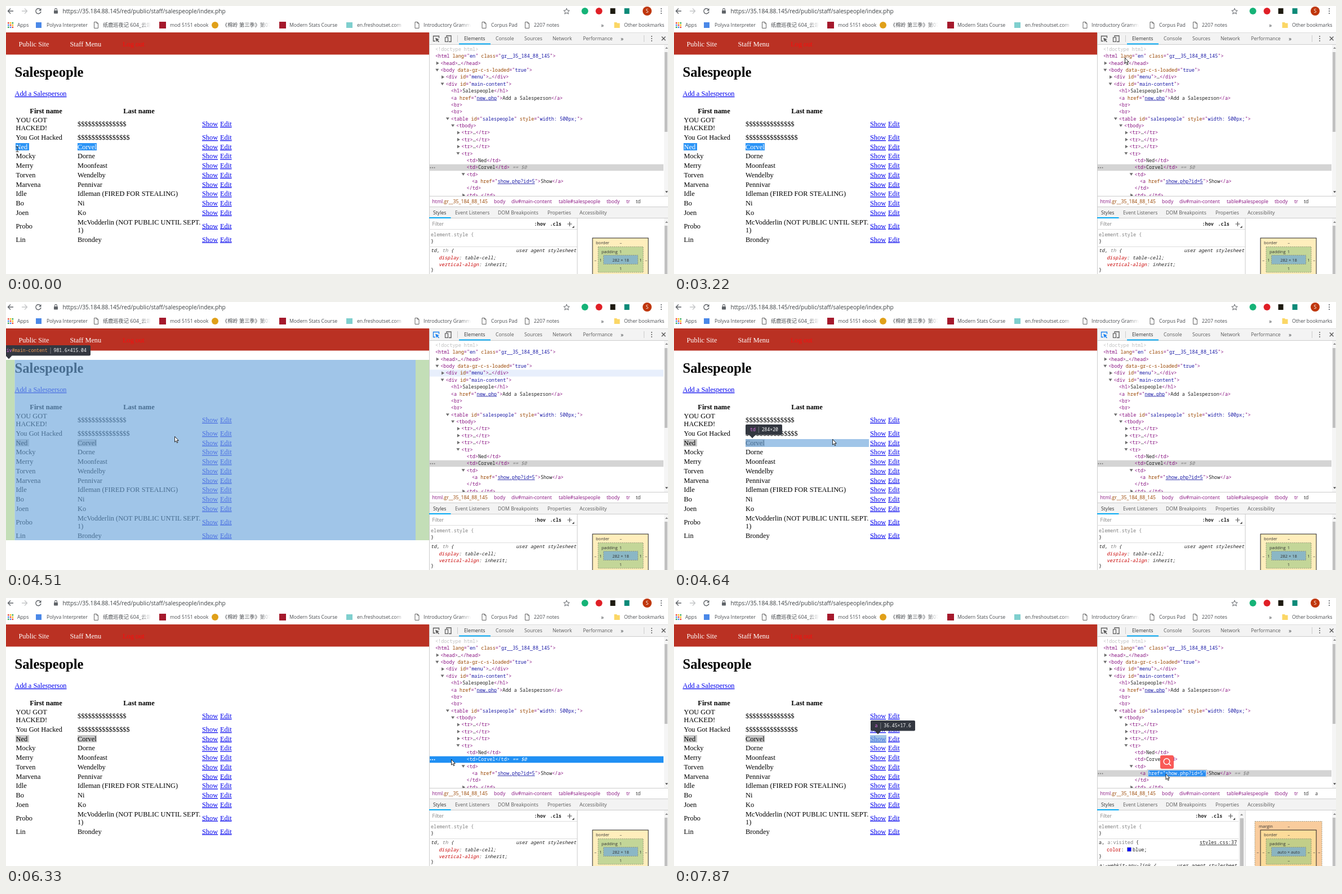
An HTML page that plays this animation: 1175 px wide and 477 px high, repeating every 8 s.

```html
<!DOCTYPE html>
<html lang="en">
<head>
<meta charset="utf-8">
<title>Salespeople</title>
<style>
html, body { margin: 0; width: 100%; height: 100%; overflow: hidden; background: #fff; }
svg { display: block; width: 100vw; height: 100vh; }
text { white-space: pre; }
.ui { font: 8.7px "Open Sans", "Noto Sans CJK SC", "Noto Sans CJK JP", "Noto Sans CJK", sans-serif; fill: #4a4d51; }
.cjk { font-size: 9.2px; }
.url { font-size: 10.2px; fill: #3c4043; }
.dev { fill: #5a5a5a; }
.dark { fill: #333; }
.box { font-size: 7.5px; fill: #333; }
.mid { text-anchor: middle; }
.end { text-anchor: end; }
.page { font: 12.36px "Liberation Serif", serif; fill: #000; }
.head { font-weight: bold; }
.h1 { font-weight: bold; font-size: 24.7px; }
.link { fill: #00e; text-decoration: underline; }
.mono { font: 8.47px "Noto Sans Mono", "DejaVu Sans Mono", monospace; fill: #222; }
.bold { font-weight: bold; }
.it { font-style: italic; }
.grey { fill: #808080; }
.prop { fill: #c80000; }
.tag { fill: #881280; }
.attr { fill: #994500; }
.val { fill: #1a1aa6; }
.under { text-decoration: underline; }
.doc { fill: #c0c0c0; }
.tip { font: 8.1px "Noto Sans Mono", "DejaVu Sans Mono", monospace; fill: #fff; }
.white, .on text, .on tspan { fill: #fff; }
.red { fill: #f90d0d; }
</style>
</head>
<body>
<svg id="stage" viewBox="0 0 1175 477" preserveAspectRatio="none"></svg>
<script>
const LOOP = 8000, PITCH = 12.37, INDENT = 9.27, CHAR = 5.082;
const esc = s => s.replace(/&/g, '&amp;').replace(/</g, '&lt;');
const text = (x, y, s, cls) => `<text x="${x}" y="${y}" class="${cls}">${esc(s)}</text>`;
const rect = (x, y, w, h, fill, more = '') => `<rect x="${x}" y="${y}" width="${w}" height="${h}" fill="${fill}" ${more}/>`;
const dot = (x, y, r, fill) => `<circle cx="${x}" cy="${y}" r="${r}" fill="${fill}"/>`;
const line = (d, color, w = 1, more = '') => `<path d="${d}" fill="none" stroke="${color}" stroke-width="${w}" ${more}/>`;
const shape = (d, fill) => `<path d="${d}" fill="${fill}"/>`;
const group = (id, body, more = '') => `<g id="${id}" ${more}>${body}</g>`;

// translucent layers shared by the page overlay and the box model
const MARGIN = 'rgba(246,178,107,.66)', BORDER = 'rgba(255,229,153,.66)';
const PADDING = 'rgba(147,196,125,.55)', CONTENT = 'rgba(111,168,220,.66)';

function browserBar() {
  const ink = '#5f6368';
  let s = rect(0, 0, 1175, 47, '#fff') + rect(751, 47, 424, 1, '#ddd');
  s += line('M13 9H4M8 4.5L3.5 9L8 13.5', ink, 1.4) + line('M28 9H37M33 4.5L37.5 9L33 13.5', '#c4c6c8', 1.4);
  s += line('M61 6.2A4.6 4.6 0 1 0 62 10', ink, 1.4) + shape('M62.5 4V8.5H58Z', ink);
  s += rect(85, 8, 7, 5.5, ink, 'rx=".8"') + line('M86.6 8V6.3A1.9 1.9 0 0 1 90.4 6.3V8', ink, 1.1);
  s += text(100.5, 13, 'https://35.184.88.145/red/public/staff/salespeople/index.php', 'ui url');
  s += line('M995 4.2L996.5 7.8L1000.2 8.1L997.4 10.5L998.3 14.2L995 12.2L991.7 14.2L992.6 10.5L989.8 8.1L993.5 7.8Z', ink);
  s += dot(1027.5, 9, 6, '#15b377') + dot(1052.5, 9, 6, '#e01f26') + rect(1072.5, 4, 9, 10, '#1d1a10');
  s += rect(1097.5, 4, 9, 10, '#0d8a78') + dot(1138, 9, 8, '#bf360c') + text(1138, 12, 'S', 'ui mid white');
  for (const y of [5, 9, 13]) s += dot(1163, y, 1.1, ink);

  const marks = [[20, 'Apps'], [72, 'Polyva Interpreter'], [172, '纸鹿巡夜记 604_云端集', 1], [291, 'mod 5151 ebook'],
    [384, '《棉岭 第三季》第07集', 1], [503, 'Modern Stats Course'], [623, 'en.freshoutset.com', 2],
    [741, 'Introductory Grammar', 2], [861, 'Corpus Pad'], [937, '2207 notes'], [1097, 'Other bookmarks']];
  for (const [x, label, fade] of marks) {
    s += text(x, 37.2, label, fade === 1 ? 'ui cjk' : 'ui');
    if (fade) s += rect(x + 66, 26, 19, 16, 'url(#fade)') + rect(x + 85, 26, 14, 16, '#fff');
  }
  const hues = ['#ea4335', '#fbbc05', '#34a853', '#4285f4'];
  for (let i = 0; i < 9; i++) s += rect(3 + i % 3 * 3.8, 29 + Math.floor(i / 3) * 3.8, 2.5, 2.5, hues[(i * 5) % 4]);
  for (const x of [160, 729.5, 848.5, 925])
    s += line(`M${x - 3.5} 28.5H${x + 1}L${x + 3.5} 31V39.5H${x - 3.5}ZM${x + 1} 28.5V31H${x + 3.5}`, '#666');
  s += rect(53, 29, 10, 10, '#4a88e8') + rect(272, 28, 12, 12, '#a5192c') + dot(371, 34, 6, '#e0a019');
  s += rect(485, 28, 12, 12, '#a5192c') + rect(604, 29, 11, 10, '#7fcfce') + text(1056, 37.5, '»', 'ui url');
  return s + shape('M1079.5 29H1084L1085 30.5H1089.5V39H1079.5Z', '#fbd766');
}

const people = [['You Got Hacked', '$'.repeat(15)], ['Ned ', 'Corvel'], ['Mocky', 'Dorne'], ['Merry', 'Moonfeast'],
  ['Torven', 'Wendelby'], ['Marvena', 'Pennivar'], ['Idle', 'Idleman (FIRED FOR STEALING)'], ['Bo', 'Ni'], ['Joen', 'Ko']];

function page() {
  let s = rect(0, 47, 751, 39.5, '#ba3123');
  s += text(22.5, 72, 'Public Site', 'page white') + text(113.5, 72, 'Staff Menu', 'page white');
  s += text(207, 72, 'Log out', 'page red');
  s += text(15.5, 126, 'Salespeople', 'page h1') + text(15.5, 160, 'Add a Salesperson', 'page link');
  s += text(71, 190.5, 'First name', 'page head mid') + text(236, 190.5, 'Last name', 'page head mid');
  const links = y => text(348, y, 'Show', 'page link') + text(380, y, 'Edit', 'page link');
  s += text(17.5, 207, 'YOU GOT', 'page') + text(17.5, 221, 'HACKED!', 'page') + text(127, 214, '$'.repeat(14), 'page') + links(214);
  s += group('sel', rect(17, 244, 24, 13, 'inherit') + rect(127, 244, 34, 13, 'inherit'));
  people.forEach(([first, last], i) => {
    const y = 238 + i * 16.72;
    const cells = text(17.5, y, first, 'page') + text(127, y, last, 'page');
    s += (i === 1 ? group('selText', cells) : cells) + links(y);
  });
  s += text(17.5, 395.5, 'Probo', 'page') + text(127, 388.5, 'McVodderlin (NOT PUBLIC UNTIL SEPT.', 'page') + text(127, 402.5, '1)', 'page') + links(395.5);
  return s + text(17.5, 419.5, 'Lin', 'page') + text(127, 419.5, 'Brondey', 'page') + links(419.5);
}

function tip(x, y, w, arrow, name, size) {
  const sep = x + w - size.length * 4.87 - 13;
  return rect(x, y, w, 18.5, '#333740', 'rx="2"') + shape(`M${arrow - 6} ${y + 18}h12l-6 6.5Z`, '#333740') +
    `<text x="${sep - 5}" y="${y + 12}" class="tip end">${name}</text>` +
    rect(sep, y + 4, 1, 11, '#7a7d84') + text(sep + 6, y + 12, size, 'tip');
}
const pink = s => `<tspan fill="#e06ee8">${s}</tspan>`;

function overlays() {
  const main = rect(0, 103, 15.5, 321, PADDING) + rect(727, 103, 24, 321, PADDING) + rect(15.5, 103, 711.5, 321, CONTENT) +
    tip(-8, 77, 158, 5, pink('div') + '<tspan fill="#f29a55">#main-content</tspan>', '981.6×415.04');
  const cell = rect(127, 244, 219, 14, CONTENT) + tip(127, 218, 65, 139, pink('td'), '284×20');
  const link = rect(348, 244, 29, 14, CONTENT) + tip(349, 218, 79, 362, pink('a'), '36.45×17.6');
  return group('ovMain', main) + group('ovCell', cell) + group('ovLink', link);
}

// indent level, arrow (1 closed, 2 open), markup
const tree = [[0, 0, '<!doctype html>'], [0, 0, '<html lang="en" class="gr__35_184_88_145">'], [1, 1, '<head>…</head>'],
  [1, 2, '<body data-gr-c-s-loaded="true">'], [2, 1, '<div id="menu">…</div>'], [2, 2, '<div id="main-content">'],
  [3, 0, '<h1>Salespeople</h1>'], [3, 0, '<a href="new.php">Add a Salesperson</a>'], [3, 0, '<br>'], [3, 0, '<br>'],
  [3, 2, '<table id="salespeople" style="width: 500px;">'], [4, 2, '<tbody>'], [5, 1, '<tr>…</tr>'], [5, 1, '<tr>…</tr>'],
  [5, 1, '<tr>…</tr>'], [5, 2, '<tr>'], [6, 0, '<td>Ned</td>'], [6, 0, '<td>Corvel</td>'], [6, 2, '<td>'],
  [7, 0, '<a href="show.php?id=5">Show</a>'], [6, 0, '</td>'], [6, 1, '<td>…</td>']];
const MENU = 4, CELL = 17, LINK_CELL = 18, LINK = 19;
const rowX = i => 762 + tree[i][0] * INDENT;
const rowY = i => 80 + i * PITCH;

function markup(src) {
  const parts = src.match(/<!.*?>|<\/?\w+|>|\s[\w-]+(?==")|="|(?<==")[^"]+|"|[^<">]+/g);
  let last = '';
  return parts.map(p => {
    const cls = p.startsWith('<!') ? 'doc' : last === '="' ? (p.includes('.php') ? 'val under' : 'val')
      : /^(<|>|="|")/.test(p) ? 'tag' : p[0] === ' ' ? 'attr' : '';
    last = p;
    return `<tspan class="${cls}">${esc(p)}</tspan>`;
  }).join('');
}

function treeRow([, arrow, src], i) {
  const x = rowX(i), y = rowY(i);
  let s = arrow === 1 ? shape(`M${x - 7.5} ${y - 6}l5 3l-5 3Z`, '#6e6e6e') : arrow === 2 ? shape(`M${x - 9} ${y - 5.3}h6l-3 4.6Z`, '#6e6e6e') : '';
  s += `<text x="${x}" y="${y}" class="mono">${markup(src)}</text>`;
  if (i === CELL || i === LINK) s += group('mark' + i, text(x + (src.length + 1) * CHAR, y, '== $0', 'mono it grey') +
    [753.5, 757, 760.5].map(d => dot(d, y - 2.5, 1, 'var(--dots)')).join(''));
  return group('row' + i, s);
}

function editor() {
  const x = rowX(LINK) + 3 * CHAR, y = rowY(LINK);
  return group('edit', rect(x - 2, y - 9.2, 105.5, 12.4, '#fff', 'stroke="#b5b5b5" stroke-width=".8"') +
    rect(x - .5, y - 8.3, 102.5, 10.8, '#2b8df0') + text(x, y, 'href="show.php?id=5"', 'mono white'));
}

function devTop() {
  let s = rect(751, 48, 424, 429, '#fff') + rect(751, 48, 424, 20, '#f3f3f3') + rect(751, 68, 424, 1, '#ccc') + rect(751, 48, 1, 429, '#ccc');
  s += group('inspect', '<path d="M762 62.5H758.5V53.5H768.5V57" fill="none"/><path d="M762 56.5L769 59.5L766.3 60.5L769 63.5L768 64.5L765.2 61.7L764 64Z" fill="currentColor" stroke="none"/>', 'stroke="currentColor" stroke-width="1.3"');
  s += line('M782 55V53H790V63.5H786', '#5a5a5a', 1.3) + rect(779.5, 56, 5, 7.5, '#f3f3f3', 'stroke="#5a5a5a" stroke-width="1.2"');
  s += rect(801, 52, 1, 12, '#ccc') + rect(1132, 52, 1, 12, '#ccc') + rect(804, 66.5, 56, 2, '#03a9f4');
  [[813, 'Elements'], [869, 'Console'], [920, 'Sources'], [970, 'Network'], [1024, 'Performance']]
    .forEach(([x, label], i) => s += text(x, 61.3, label, i ? 'ui dev' : 'ui dark'));
  s += text(1091, 61.8, '»', 'ui url');
  for (const y of [54, 58, 62]) s += dot(1146, y, 1, '#5a5a5a');
  return s + line('M1163.8 54.5L1170.5 61.2M1170.5 54.5L1163.8 61.2', '#5a5a5a', 1.4);
}

function devLower() {
  let s = rect(1168, 69, 7, 269, '#f5f5f5') + rect(1169, 82, 5, 142, '#c1c1c1');
  s += shape('M1170 76h5l-2.5-3Z', '#888') + shape('M1170 329.5h5l-2.5 3Z', '#444');
  s += rect(752, 338, 423, 139, '#fff') + rect(751, 338, 424, 1, '#ccc') + rect(752, 357, 423, 20.5, '#f3f3f3') + rect(751, 357, 424, 1, '#ccc') + rect(751, 377, 424, 1, '#ccc');
  s += '<text x="756.5" y="351.3" class="ui tag">html<tspan class="attr">.gr__35_184_88_145</tspan></text>';
  [[866, 'body'], [897, 'div#main-content'], [981, 'table#salespeople'], [1066, 'tbody'], [1101, 'tr']]
    .forEach(([x, label]) => s += text(x, 351.3, label, 'ui tag'));
  s += text(1118, 351.3, 'td', 'ui dark') + group('crumbA', text(1138, 351.3, 'a', 'ui dark'));
  [[758, 'Styles'], [797, 'Event Listeners'], [873, 'DOM Breakpoints'], [961, 'Properties'], [1018, 'Accessibility']]
    .forEach(([x, label], i) => s += text(x, 370.5, label, i ? 'ui dev' : 'ui dark'));
  s += rect(751, 376, 38.5, 2, '#03a9f4') + text(756.5, 391, 'Filter', 'ui grey');
  s += text(754, 409.5, 'element.style {', 'mono grey') + text(754, 422, '}', 'mono');
  s += rect(751, 397, 263, 1, '#ddd') + rect(751, 428, 263, 1, '#ddd') + rect(1013.5, 378, 1, 99, '#ccc');
  s += rect(1168, 378, 7, 99, '#f5f5f5') + rect(1169, 391, 5, 86, '#c1c1c1') + shape('M1170 386h5l-2.5-3Z', '#888');
  return s + group('styleTd', styleTd()) + group('styleA', styleA());
}

function tools(x) {
  return text(x, 391, ':hov', 'mono bold') + text(x + 28, 391, '.cls', 'mono bold') +
    line(`M${x + 59} 388H${x + 67}M${x + 63} 384V392`, '#555', 1.2) + shape(`M${x + 71} 391v4h-4Z`, '#555');
}

const frame = (x, y, w, h, fill, dash) => rect(x + .5, y + .5, w, h, fill, `stroke="${dash ? '#8a8a70' : '#222'}" ${dash ? 'stroke-dasharray="2 1.5" stroke-width=".8"' : ''}`);

function boxModel(pad, size, margin) {
  const label = (x, y, s, cls = 'mid') => text(x, y, s, 'ui box ' + cls);
  let s = margin ? frame(1030.5, 397, 119, 109, MARGIN, 1) + label(1038, 408.5, 'margin', '') + label(1091, 408.5, '–') : '';
  s += frame(1040.5, 412.5, 99, 78, BORDER) + label(1047, 424, 'border', '') + label(1091, 424, '–');
  s += frame(1050.5, 428, 80, 45.5, PADDING, 1) + label(1057, 439.5, 'padding', '') + label(1091, 439.5, pad);
  s += frame(1060, 443, 61, 16, CONTENT, 1) + label(1091, 454.7, size) + label(1091, 469.7, pad);
  const sides = [[1055.5, pad], [1126.5, pad], [1046, '–'], [1136, '–']];
  if (margin) sides.push([1036, '–'], [1145, '–']);
  return s + sides.map(([x, v]) => label(x, 454.7, v)).join('');
}

function styleTd() {
  const rule = (y, prop, value) => `<text x="768" y="${y}" class="mono it"><tspan class="prop">${prop}</tspan>: ${value};</text>`;
  return tools(937.5) + '<text x="754" y="438.3" class="mono it">td, <tspan class="grey">th</tspan> {</text>' +
    text(1012, 438.3, 'user agent stylesheet', 'mono it end dev') + rule(451, 'display', 'table-cell') + rule(462.5, 'vertical-align', 'inherit') +
    text(754, 473, '}', 'mono') + boxModel('1', '282 × 18');
}

function styleA() {
  return rect(1002, 378, 11.5, 99, '#f5f5f5') + rect(1004.5, 392, 6.5, 85, '#c1c1c1') + shape('M1005 387h5l-2.5-3Z', '#888') + tools(925) +
    '<text x="754" y="438.3" class="mono">a, <tspan class="grey">a:visited</tspan> {</text>' + text(999, 438.3, 'styles.css:37', 'mono end under dev') +
    '<text x="768" y="451" class="mono"><tspan class="prop">color</tspan>: <tspan x="814">blue;</tspan></text>' + rect(804.5, 444, 7, 7, '#00f', 'stroke="#888" stroke-width=".5"') +
    text(754, 462.5, '}', 'mono') + rect(751, 466, 251, 1, '#ddd') + text(754, 478.5, 'a:-webkit-any-link {', 'mono it') +
    text(999, 478.5, 'user agent stylesheet', 'mono it end dev') + boxModel('–', 'auto × auto', true);
}

const stage = document.getElementById('stage');
stage.innerHTML = '<defs><linearGradient id="fade"><stop offset="0" stop-color="#fff" stop-opacity="0"/><stop offset="1" stop-color="#fff"/></linearGradient></defs>' +
  page() + overlays() + browserBar() + devTop() +
  group('hover', rect(752, 0, 415, 12.2, '#e8effc')) + group('bg', rect(752, 0, 415, 11.6, 'inherit')) +
  tree.map(treeRow).join('') + editor() + devLower() +
  group('popup', rect(0, 0, 24, 24, '#f95a57', 'rx="3"') + '<circle cx="11.5" cy="11" r="5.3" fill="none" stroke="#fff" stroke-width="1.5"/>' + line('M15.5 15L19 18.5', '#fff', 1.6)) +
  group('beam', line('M-2.5 -4.5H-.5L0 -4L.5 -4.5H2.5M0 -4V4M-2.5 4.5H-.5L0 4L.5 4.5H2.5', '#222')) +
  group('arrow', '<path d="M.5 .3V10.2L2.8 8.1L4.4 11.7L6 11L4.4 7.5H7.3Z" fill="#fff" stroke="#111" stroke-width=".9"/>');

const el = id => document.getElementById(id);
const show = (id, on) => { el(id).style.display = on ? '' : 'none'; };
const move = (id, x, y) => el(id).setAttribute('transform', `translate(${x} ${y})`);

// start time, x, y of the pointer
const path = [[0, 20, 255], [1010, 42, 259], [1150, 70, 263], [1290, 98, 263], [1430, 124, 259], [1580, 148, 256], [1720, 152, 254],
  [1860, 146.5, 253], [2130, 180, 268], [2270, 250, 290], [2400, 340, 300], [2530, 440, 288], [2670, 540, 250], [2800, 630, 200],
  [2940, 690, 150], [3070, 722, 118], [3220, 800, 92], [3370, 910, 68], [3510, 993, 56], [3660, 860, 54], [3800, 772, 56],
  [4110, 764, 58], [4510, 299, 239], [4640, 281, 244], [4790, 256, 247], [4940, 243, 248], [5910, 480, 266], [6050, 714, 276],
  [6330, 790, 287], [6470, 815, 298], [6600, 840, 309], [6740, 855, 314], [6870, 862, 314], [7010, 864, 313], [7870, 872.5, 313]];

function draw(t) {
  const within = (a, b) => t >= a && t < b;
  const [at, x, y] = path.findLast(p => p[0] <= t);
  const beam = t < 2400;
  show('beam', beam);
  show('arrow', !beam);
  move(beam ? 'beam' : 'arrow', x, y);

  const editing = t >= 7600, onLink = t >= 7440, blue = within(5350, 7600);
  show('popup', within(160, 3220) || editing);
  move('popup', editing ? 863 : 19, editing ? 280 : 220);
  el('popup').style.opacity = editing || at < 1010 ? 1 : at <= 1860 ? 1 - .45 * (at - 1010) / 850 : .55 * (3220 - at) / 1360;

  el('sel').style.fill = t < 4110 ? '#2b94f6' : '#c8c8c8';
  el('selText').setAttribute('class', t < 4110 ? 'on' : '');
  show('ovMain', within(4510, 4640));
  show('ovCell', within(4640, 5350));
  show('ovLink', t >= 6600);
  el('inspect').style.color = within(4110, 5350) ? '#1a80f0' : '#5a5a5a';

  const row = onLink ? LINK : CELL;
  move('bg', 0, rowY(row) - 8.6);
  el('bg').style.fill = blue ? '#2090f4' : '#d4d4d4';
  for (const i of [CELL, LINK]) {
    el('row' + i).setAttribute('class', blue && i === row ? 'on' : '');
    show('mark' + i, i === row);
  }
  stage.style.setProperty('--dots', blue ? '#fff' : '#777');
  const hover = within(4510, 4640) ? MENU : within(6470, 6600) ? LINK_CELL : within(6600, 7440) ? LINK : -1;
  show('hover', hover >= 0);
  if (hover >= 0) move('hover', 0, rowY(hover) - 9);
  show('edit', editing);
  show('styleTd', !onLink);
  show('styleA', onLink);
  show('crumbA', onLink);
}

const start = performance.now();
function tick() {
  draw((performance.now() - start) % LOOP);
  requestAnimationFrame(tick);
}
tick();
</script>
</body>
</html>
```
